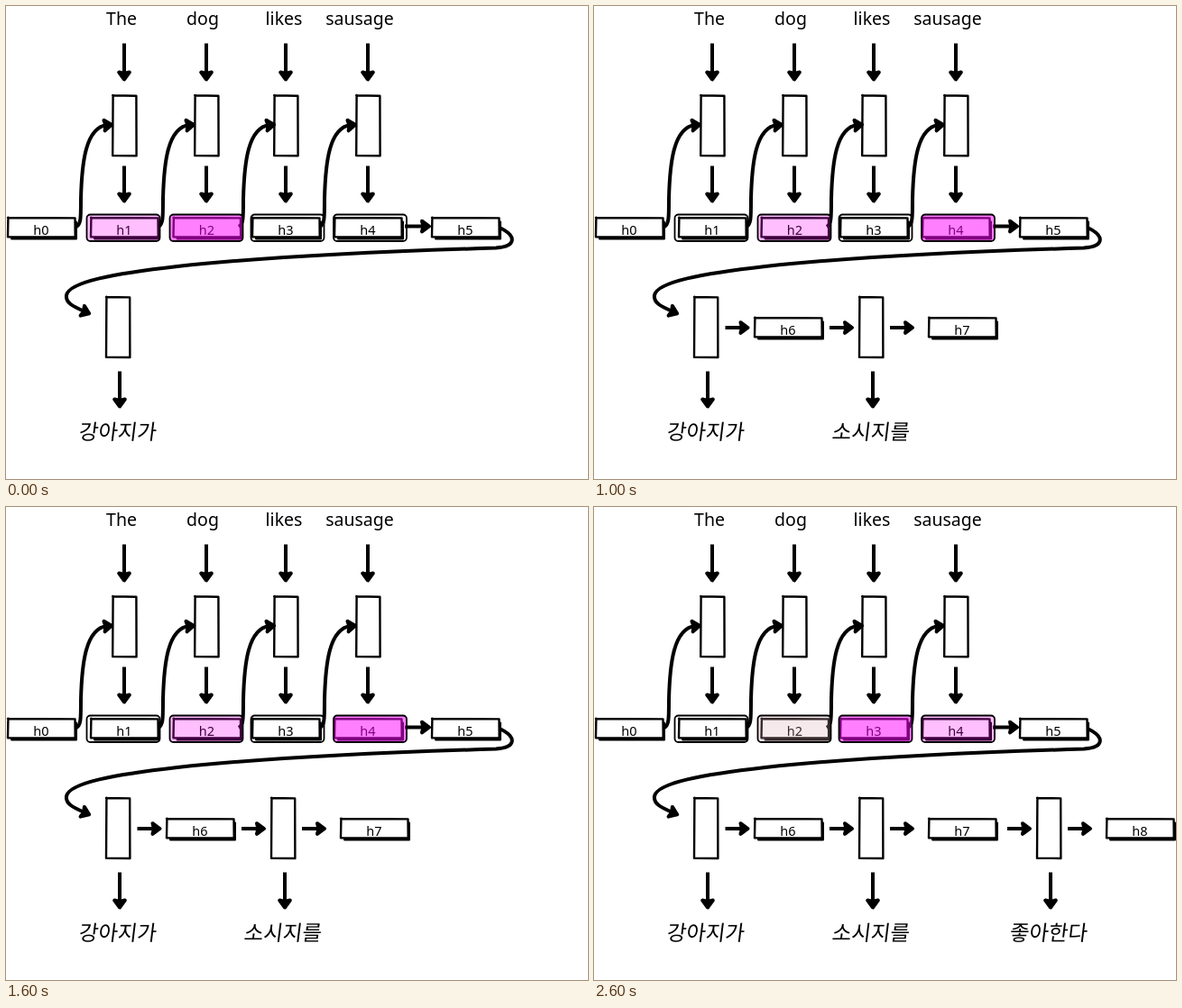
An HTML page that plays this animation: 645 px wide and 525 px high, repeating every 3000 ms.

```html
<!DOCTYPE html>
<html lang="en">
<head>
<meta charset="utf-8">
<style>
  html, body { margin: 0; width: 100%; height: 100%; overflow: hidden; background: #fff; }
  svg { display: block; }
  path, rect { fill: none; stroke: #000; stroke-linejoin: round; stroke-linecap: round; }
  .line { stroke-width: 4; stroke-linecap: butt; }
  .head { fill: #000; stroke-width: 4; }
  .box { fill: #fff; stroke-width: 2.4; }
  .shadow { fill: #000; stroke-width: 1; }
  .glow { stroke: none; }
  .ring { stroke-width: 1.8; }
  text { text-anchor: middle; font-family: "Noto Sans", sans-serif; }
  .word { font-size: 19.5px; }
  .label { font-size: 14.5px; font-weight: 300; }
  .korean { font: 23.4px "Noto Sans CJK KR", "Noto Sans CJK", sans-serif; }
</style>
</head>
<body>
<svg id="stage" width="645" height="525" viewBox="0 0 645 525"></svg>
<script>
const stage = document.getElementById('stage');

function add(parent, tag, attrs, content = '') {
  const node = document.createElementNS('http://www.w3.org/2000/svg', tag);
  for (const key in attrs) node.setAttribute(key, attrs[key]);
  node.textContent = content;
  return parent.appendChild(node);
}

const group = () => add(stage, 'g', {});
const line = (g, d) => add(g, 'path', { class: 'line', d });
const head = (g, x, y, angle) => add(g, 'path', {
  class: 'head', d: 'M-10 -5.8L-2 0L-10 5.8L-8.5 0Z',
  transform: `translate(${x} ${y}) rotate(${angle})`
});

function down(g, x, y, length) {
  line(g, `M${x} ${y}v${length - 7}`);
  head(g, x, y + length, 90);
}

function right(g, x, y, length) {
  line(g, `M${x} ${y}h${length - 7}`);
  head(g, x + length, y, 0);
}

// Slightly uneven outline, as if drawn by hand
function sketch(g, x, y, w, h) {
  add(g, 'path', {
    class: 'box',
    d: `M${x} ${y}L${x + w} ${y + .4}L${x + w + .2} ${y + h}L${x} ${y + h - .3}L${x + .4} ${y - .3}`
  });
}

const cell = (g, x, y) => sketch(g, x, y, 26.2, 67);

function state(g, x, y, name) {
  add(g, 'rect', { class: 'shadow', x: x + 4, y: y + 4, width: 72.5, height: 20 });
  sketch(g, x, y, 74.5, 21.5);
  add(g, 'text', { class: 'label', x: x + 37, y: y + 18.8 }, name);
}

function output(g, x, word) {
  cell(g, x, 323);
  down(g, x + 15, 405.5, 41);
  add(g, 'text', {
    class: 'korean', transform: `translate(${x + 12} 481) skewX(-7)`
  }, word);
}

// Encoder
const encoder = group();
[2, 94, 185.5, 273, 364, 472].forEach((x, i) => state(encoder, x, 235, 'h' + i));
[['The', 128, 131], ['dog', 218, 222], ['likes', 308, 310], ['sausage', 392, 401]]
  .forEach(([word, wordX, x], i) => {
    add(encoder, 'text', { class: 'word', x: wordX, y: 20.5 }, word);
    down(encoder, x, 41.5, 42);
    cell(encoder, x - 12.8, 99.3);
    down(encoder, x, 177.5, 41);
    const dx = [0, 91, 180, 270][i];
    line(encoder, `M78 245c5 -3 5 -9 5 -31c1 -40 5 -79 29 -82`);
    encoder.lastChild.setAttribute('transform', `translate(${dx})`);
    head(encoder, 119 + dx, 131.5, -6);
  });
right(encoder, 442, 244.5, 29);
line(encoder, 'M547 246C566 255 566 267 543 268.5C430 272 300 277 190 289C120 297 70 306 67 321C66 329 73 333 87 339');
head(encoder, 94, 342, 22);

// Attention overlays
const glows = [89.5, 181.5, 271.5, 363].map(x => {
  const area = { x, y: 231.5, width: 81, height: 29.5, rx: 4 };
  const glow = add(stage, 'rect', { class: 'glow', ...area });
  add(stage, 'rect', { class: 'ring', ...area });
  return glow;
});

// Decoder, one group per step
const steps = [group(), group(), group()];
output(steps[0], 111, '강아지가');

right(steps[1], 145.5, 357, 27);
state(steps[1], 178, 346, 'h6');
right(steps[1], 261, 357, 27);
output(steps[1], 294, '소시지를');
right(steps[1], 328, 357, 27);
state(steps[1], 371, 346, 'h7');

right(steps[2], 458, 357, 27);
output(steps[2], 491, '좋아한다');
right(steps[2], 525, 357, 27);
state(steps[2], 568, 346, 'h8');

const none = 'none', soft = '#ff00ff40', strong = '#ff00ff80', faint = '#d7a7b340';
const attention = [
  [soft, strong, none, none],
  [none, soft, none, strong],
  [none, faint, strong, soft]
];

function draw() {
  const step = Math.floor(performance.now() % 3000 / 1000);
  steps.forEach((g, i) => g.setAttribute('visibility', i <= step ? 'visible' : 'hidden'));
  glows.forEach((glow, i) => glow.style.fill = attention[step][i]);
  requestAnimationFrame(draw);
}
draw();
</script>
</body>
</html>
```
